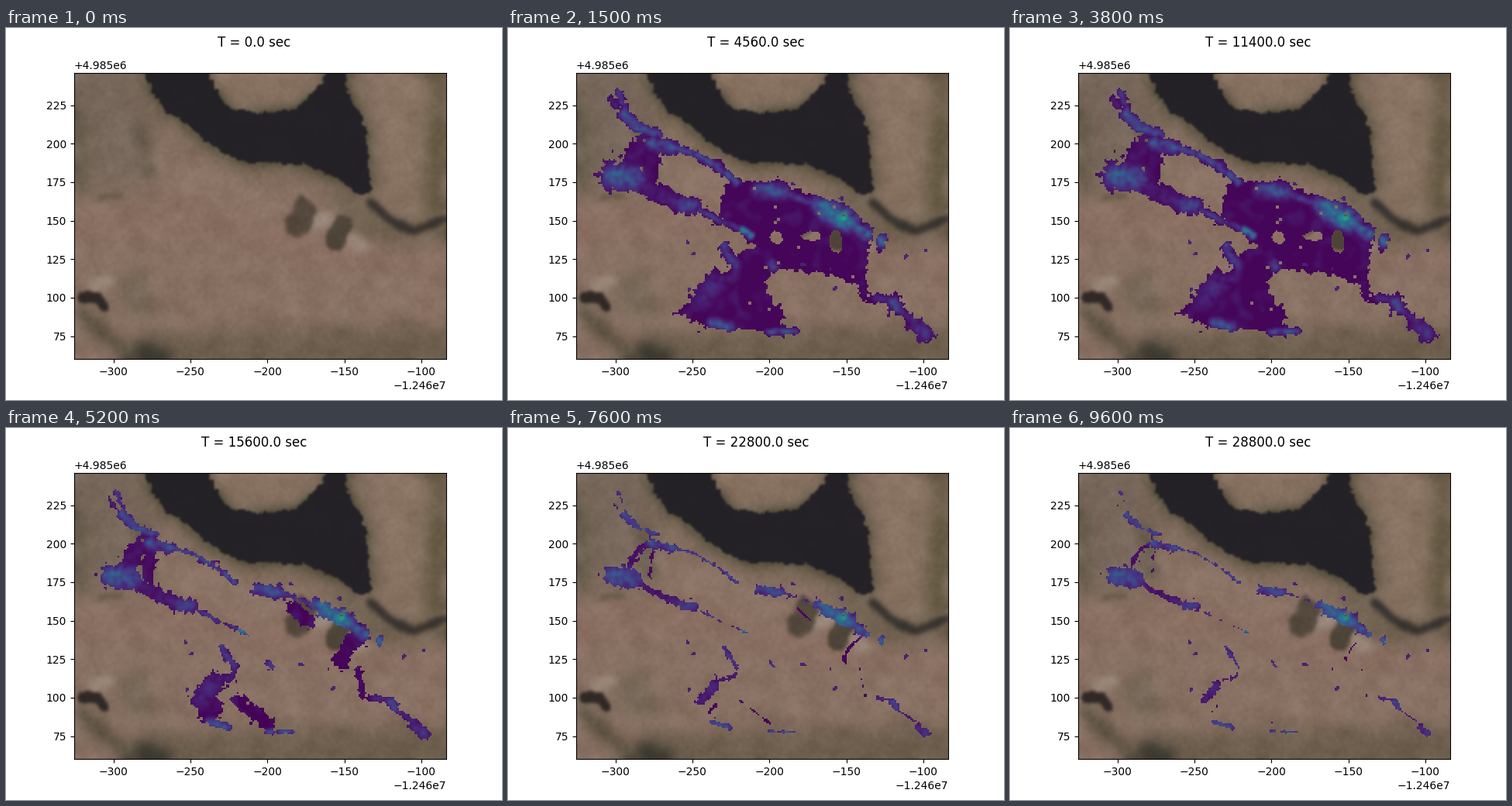
Animation, 640 px wide and 480 px high, one loop 9.65 s. Source, as a matplotlib script:

```python
import numpy as np
import matplotlib.pyplot as plt
from matplotlib.animation import FuncAnimation
from matplotlib.colors import to_rgb
from matplotlib.path import Path

FRAMES, INTERVAL = 193, 50
NX, NY = 240, 185
LEFT, TOP, WIDTH, HEIGHT = 88, 57.6, 480, 369.6

# Shapes are laid out in stage pixels on a grid of roughly 2 px cells.
X, Y = np.meshgrid(LEFT + WIDTH / NX * (np.arange(NX) + 0.5),
                   TOP + HEIGHT / NY * (np.arange(NY) + 0.5))
rng = np.random.default_rng(7)


def blur(a, sx, sy=None):
    sy = sx if sy is None else sy
    pad = int(3 * max(sx, sy)) + 2
    a = np.pad(a, pad, mode="edge")
    fy = np.fft.fftfreq(a.shape[0])[:, None]
    fx = np.fft.fftfreq(a.shape[1])[None, :]
    gain = np.exp(-2 * np.pi**2 * ((sx * fx)**2 + (sy * fy)**2))
    return np.fft.ifft2(np.fft.fft2(a) * gain).real[pad:-pad, pad:-pad]


def noise(sx, sy=None):
    n = blur(rng.standard_normal((NY, NX)), sx, sy)
    return n / n.std()


wobble_x, wobble_y = noise(1), noise(1)
patchy = noise(2.5)


def inside(pts, wobble=1.3):
    cells = np.column_stack([(X + wobble * wobble_x).ravel(),
                             (Y + wobble * wobble_y).ravel()])
    return Path(pts).contains_points(cells).reshape(NY, NX)


def dist(pts):
    best = np.full((NY, NX), 1e9)
    for (x0, y0), (x1, y1) in zip(pts, pts[1:]):
        dx, dy = x1 - x0, y1 - y0
        u = np.clip(((X - x0) * dx + (Y - y0) * dy) / (dx * dx + dy * dy), 0, 1)
        best = np.minimum(best, np.hypot(X - x0 - u * dx, Y - y0 - u * dy))
    return best


# ---- aerial view -------------------------------------------------------

ground = np.ones((NY, NX, 3)) * to_rgb("#887163")


def cover(color, mask):
    m = np.clip(mask, 0, 1)[..., None]
    ground[:] = ground * (1 - m) + m * np.array(to_rgb(color))


def paint(color, soft, width, *pts, alpha=0.85):
    mask = dist(pts) + 0.08 * width * patchy < width / 2
    cover(color, alpha * blur(mask.astype(float), soft))


lake = inside([(176, 50), (190, 85), (205, 108), (238, 127), (255, 145), (295, 170),
               (320, 174), (385, 176), (430, 198), (460, 219), (470, 210), (466, 150),
               (460, 115), (440, 85), (434, 50), (416, 50), (405, 75), (370, 105),
               (325, 110), (285, 102), (253, 50)]).astype(float)

# fields and sand
paint("#75665a", 7, 100, (125, 55), (140, 160))
paint("#5f5644", 4, 14, (96, 105), (97, 212))
paint("#64594a", 3, 18, (176, 130), (182, 185))
paint("#635746", 1.5, 9, (122, 219), (146, 216))
paint("#8b6c5e", 7, 32, (88, 262), (220, 238), (400, 290), (568, 300), alpha=0.6)
paint("#927a6c", 4, 20, (200, 165), (350, 238), alpha=0.6)
# south-west corner and southern grass
paint("#675a49", 6, 46, (190, 416), (568, 410))
paint("#43402f", 4, 15, (95, 365), (160, 425))
paint("#32312a", 4, 20, (175, 415), (205, 424))
paint("#6d6050", 5, 40, (165, 335), (168, 355))
paint("#9b8979", 2, 16, (115, 332), (132, 328))
paint("#2b2522", 1, 13, (98, 349), (118, 348), (127, 360), alpha=0.95)
# green banks fade out with distance from the lake
cover("#695d4b", 1.7 * blur(lake, 9))
cover("#4d4936", 1.1 * blur(lake, 4) * (1 + 0.2 * patchy))
paint("#877160", 4, 64, (300, 60), (372, 60))
paint("#8a7563", 5, 50, (508, 55), (512, 215))
paint("#585138", 5, 24, (558, 60), (552, 240))
paint("#6a5d4b", 6, 40, (440, 235), (500, 262), (568, 258))
paint("#2b2926", 1.5, 12, (470, 226), (492, 246), (525, 262), (568, 246))
# bright sand beside lone trees
paint("#a08e83", 2, 17, (396, 252), (412, 246))
paint("#9a877b", 2, 16, (444, 272), (460, 284))
paint("#4c4237", 1.2, 28, (386, 232), (375, 257))
paint("#453d32", 1, 22, (434, 250), (424, 278))
cover("#242127", blur(lake, 0.6))

land = np.clip((ground.mean(axis=2) - 0.16) / 0.15, 0.1, 1)
flow = np.sin((Y - 0.12 * X) / 6 + 2 * noise(14)) * ((Y > 220) & (Y < 385))
texture = 0.007 * noise(0.8) + 0.010 * noise(3.5) + 0.006 * blur(flow, 2)
ground = np.clip(ground + (land * texture)[..., None], 0, 1)

# ---- flooded area ------------------------------------------------------

MID_SHEET = [(280, 203), (350, 198), (376, 211), (432, 227), (465, 262), (462, 292),
             (456, 328), (440, 331), (420, 321), (352, 312), (335, 320), (290, 318),
             (296, 292), (318, 282), (300, 262), (272, 245)]
SOUTH_SHEET = [(292, 312), (331, 316), (334, 342), (348, 358), (360, 391), (320, 391),
               (265, 386), (212, 368), (246, 349), (264, 324)]
ISLANDS = [(345, 270, 8, 8), (390, 269, 13, 6), (422, 276, 9, 14)]
PUDDLES = [(231, 277), (239, 292), (233, 338), (367, 201), (430, 220), (512, 296),
           (537, 289), (422, 335), (415, 311), (380, 305)]

# Channels: half width once the sheets are gone, relative depth, path.
WEST = [
    (3, 0.15, (142, 84), (149, 100), (153, 112)),
    (3, 0.10, (134, 94), (147, 112)),
    (6, 0.20, (150, 113), (167, 128)),
    (4, 0.20, (167, 129), (195, 138)),
    (7, 0.21, (185, 149), (213, 155)),
    (3.5, 0.19, (213, 155), (240, 162), (270, 180), (296, 200)),
    (11, 0.05, (180, 149), (166, 160), (157, 178)),
    (8, 0.02, (188, 150), (182, 192)),
    (15, 0.24, (136, 191), (161, 195)),
    (9, 0.08, (165, 197), (185, 211), (222, 227)),
    (8, 0.20, (226, 229), (240, 231)),
    (2.5, 0.15, (240, 232), (275, 250), (302, 261)),
    (2.5, 0.38, (302, 261), (313, 268)),
]
EAST = [
    (8, 0.22, (325, 210), (352, 212)),
    (3, 0.15, (357, 214), (395, 227)),
    (9, 0.00, (372, 233), (390, 249)),
    (11, 0.38, (409, 236), (438, 249)),
    (7, 0.25, (398, 228), (440, 251), (462, 266)),
    (5, 0.26, (481, 272), (481, 278)),
    (11, 0.02, (455, 270), (440, 283), (432, 300)),
    (4, 0.03, (453, 310), (459, 345), (475, 350)),
    (4, 0.10, (475, 349), (493, 351)),
    (6, 0.18, (495, 352), (500, 361)),
    (4, 0.10, (502, 364), (526, 380)),
    (9, 0.12, (528, 385), (537, 394)),
]
SOUTH = [
    (4.5, 0.18, (279, 283), (293, 306)),
    (5, 0.08, (296, 306), (292, 322), (274, 325)),
    (13, 0.09, (268, 330), (252, 350)),
    (13, 0.01, (260, 367), (268, 359)),
    (5, 0.22, (264, 380), (286, 386)),
    (9, 0.00, (300, 352), (336, 380)),
    (4, 0.18, (339, 304), (342, 309)),
    (2.3, 0.20, (335, 392), (370, 392)),
]

grain, ripple = noise(0.8), 1 + 0.2 * noise(1.2)
flooded = inside(MID_SHEET, 2) | inside(SOUTH_SHEET, 2)
dry_at = np.full((NY, NX), 79.0) + 6 * rng.random((NY, NX))
depth = 0.012 + 0.025 * np.clip(noise(2.5), 0, 2)

for width, deep, *pts in WEST + EAST + SOUTH:
    far = dist(pts)
    edge = far * (1 + 0.12 * grain) + 0.7 * grain
    flooded |= edge < 1.1 * width + 2
    # Width decays towards what the depth can hold; solve for the drying frame.
    rest = width * (1 - np.exp(-deep / 0.12)) - 1.5
    excess = np.maximum((edge - rest) / (width - rest), 1e-4)
    dry_at = np.maximum(dry_at, 104 - 30 * np.log(excess))
    depth = np.maximum(depth, deep * ripple * np.exp(-(far / (width + 2))**2))

for cx, cy, rx, ry in ISLANDS:
    flooded &= ((X - cx) / rx)**2 + ((Y - cy) / ry)**2 + 0.2 * grain > 1
pin = rng.random((NY, NX)) < 0.0025
pin |= np.roll(pin, 1, axis=0)
pin |= np.roll(pin, 1, axis=1)
flooded &= ~pin

for px, py in PUDDLES:
    pool = np.hypot(X - px, Y - py) + 0.8 * grain < 2.6
    flooded |= pool
    dry_at[pool] = FRAMES
    depth[pool] = 0.1

# The front runs from the north-west corner down to the outlet.
reach = (X - 110 + 0.5 * (Y - 80)) / 590
wet_at = 1 + 11 * np.clip(reach + 0.02 * noise(2), 0, 1)

# ---- figure ------------------------------------------------------------

X0, Y0 = -1.246e7, 4.985e6
extent = (X0 - 325.45, X0 - 83.85, Y0 + 60.1, Y0 + 246.1)

fig, ax = plt.subplots(figsize=(6.4, 4.8), dpi=100)
ax.imshow(ground, extent=extent, interpolation="bilinear")
water = ax.imshow(np.zeros((NY, NX, 4)), extent=extent, interpolation="nearest")
title = fig.suptitle("T = 0.0 sec")


def draw(i):
    title.set_text(f"T = {120.0 * int(1.25 * i + 0.5)} sec")
    level = 1 - 0.14 * np.clip((i - 76) / 80, 0, 1)
    rgba = plt.cm.viridis(depth * level)
    rgba[..., 3] = flooded & (wet_at <= i) & (i < dry_at)
    water.set_data(rgba)
    return water, title


anim = FuncAnimation(fig, draw, frames=FRAMES, interval=INTERVAL, repeat=True)
plt.show()
```
